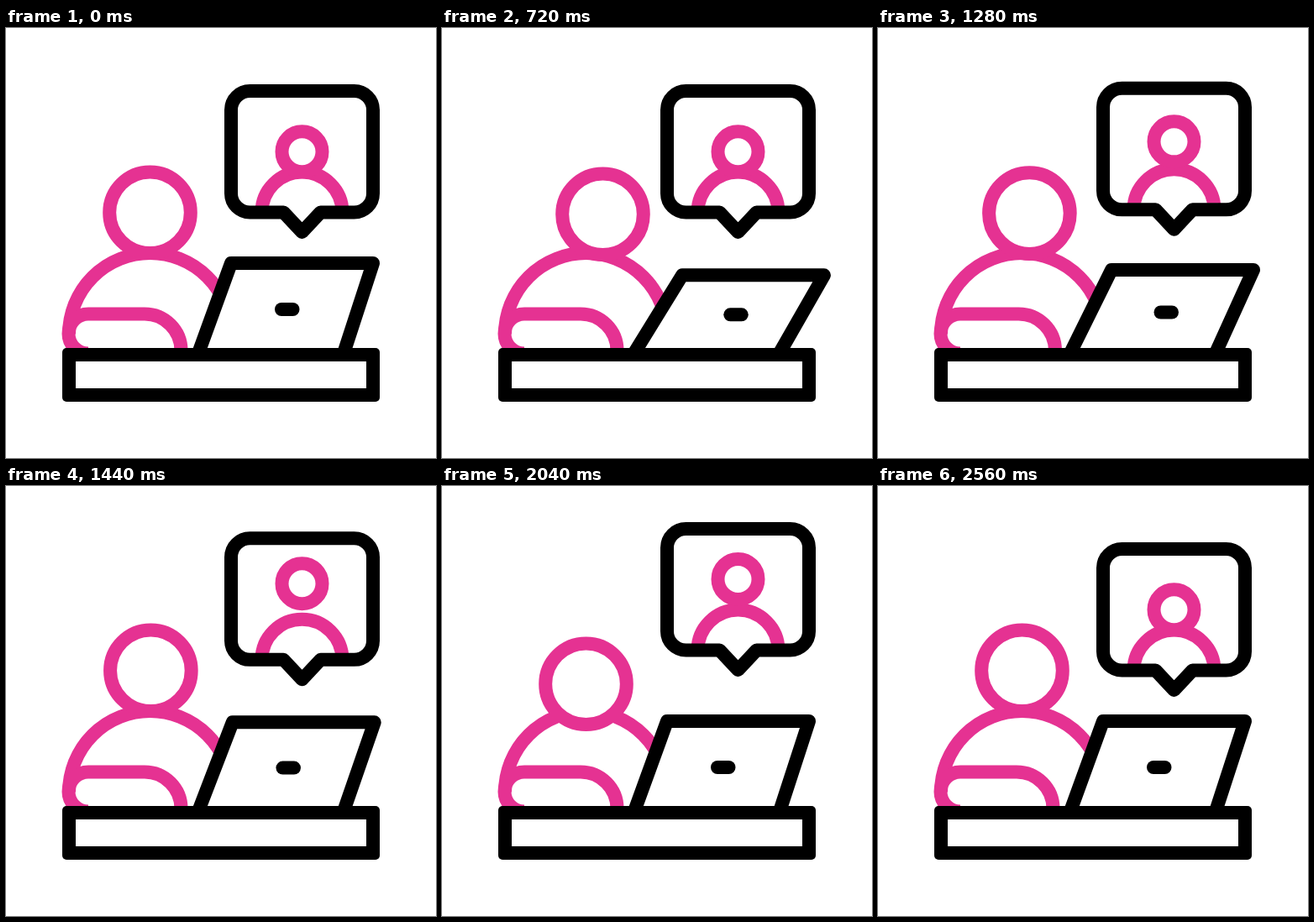
An HTML page for the animation above (2720 ms loop, 512 by 512 pixels).

```html
<!DOCTYPE html>
<html lang="en">
<head>
<meta charset="utf-8">
<title>Online meeting</title>
<style>
  html, body { margin: 0; height: 100%; overflow: hidden; background: #fff; }
  svg { display: block; width: 100vw; height: 100vh; }
  .line { fill: #fff; stroke: #000; stroke-width: 16; stroke-linejoin: round; stroke-linecap: round; }
  .pink { stroke: #e53292; stroke-linecap: butt; }
  .open { fill: none; }
</style>
</head>
<body>
<svg viewBox="0 0 512 512">
  <g class="person">
    <path class="line pink open" d="M75 364.5A96.5 96.5 0 0 1 268 364.5"/>
    <path id="arm" class="line pink open"/>
    <circle id="head" class="line pink" cx="171.5" cy="219.7" r="48.3"/>
  </g>
  <path id="lid" class="line"/>
  <path id="camera" class="line" d="M328 335H341.5"/>
  <rect x="67" y="381" width="378" height="64" rx="5"/>
  <rect x="83" y="397" width="346" height="32" fill="#fff"/>
  <g id="bubble">
    <rect x="268" y="75" width="169" height="144" rx="22" fill="#fff"/>
    <path class="line pink open" d="M304.5 219.5a48 48 0 0 1 96 0"/>
    <circle id="caller" class="line pink" cx="352.5" cy="147.3" r="24"/>
    <!-- hides the shoulders below the frame -->
    <path d="M300 212H405V228H300z" fill="#fff"/>
    <path class="line open" d="M290.5 219.5H330.5L352.5 243L374.5 219.5H414.5A22.5 22.5 0 0 0 437 197V97.500A22.500 22.500 0 0 0 414.500 75H290.500A22.500 22.500 0 0 0 268 97.500V197A22.500 22.500 0 0 0 290.500 219.500z"/>
  </g>
</svg>
<script>
const LOOP = 2720, STEP = 40;
const part = id => document.getElementById(id);
const move = (id, x, y) => part(id).setAttribute('transform', `translate(${x} ${y})`);

// Eased 0 to 1 between two times
const ease = (t, from, to) => {
  const u = Math.min(1, Math.max(0, (t - from) / (to - from)));
  return u * u * (3 - 2 * u);
};
// Goes out during a..b and returns during c..d
const swing = (t, a, b, c, d) => ease(t, a, b) - ease(t, c, d);

function draw(t) {
  const lean = swing(t, 80, 640, 1025, 1500);
  const nod = swing(t, 1630, 2020, 2040, 2430);
  const tilt = swing(t, 335, 815, 1030, 1530);
  const rise = swing(t, 1150, 1770, 1900, 2490);
  const lift = swing(t, 1055, 1585, 1720, 2400);
  const reach = 4.5 * (swing(t, 840, 1140, 1140, 1440) + swing(t, 1440, 1740, 1740, 2050));

  move('head', 20 * lean, 2 * lean + 16 * nod);
  move('camera', 17 * tilt, 7 * tilt);
  move('bubble', 0, -28 * rise);
  move('caller', 0, -22.6 * lift);

  const x = 20 * tilt, y = 280 + 16 * tilt;
  part('lid').setAttribute('d', `M229.500 386L${268 + x} ${y}H${437 + x}L402.500 386`);
  part('arm').setAttribute('d',
    `M98 387.500A23.500 23.500 0 0 1 98 340.500H${165 + reach}a43.500 43.500 0 0 1 43.500 43.500`);
}

function frame() {
  const t = performance.now() % LOOP;
  draw(Math.floor(t / STEP) * STEP);
  requestAnimationFrame(frame);
}
frame();
</script>
</body>
</html>
```
